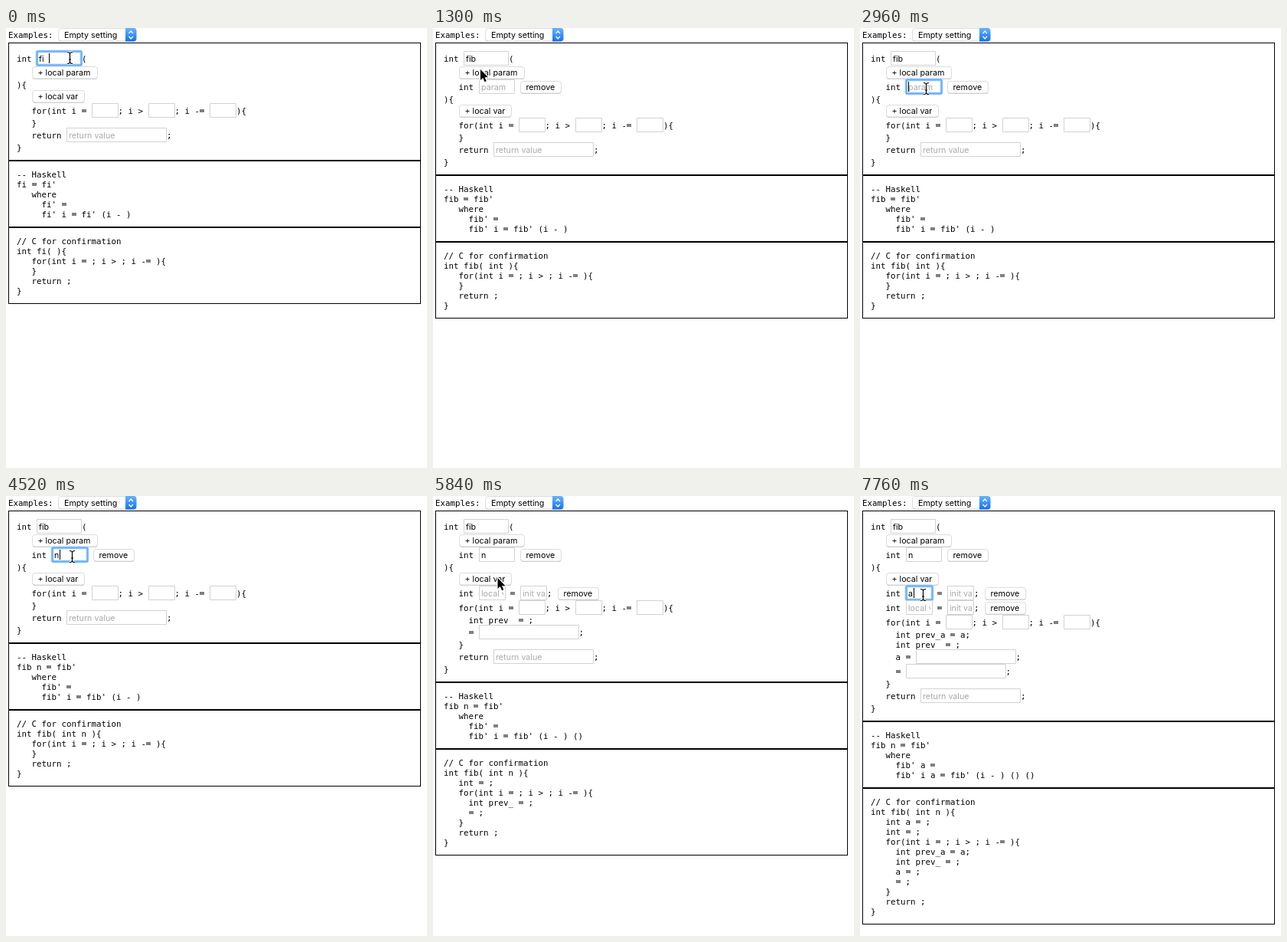
An HTML page with a canvas for the animation above (8000 ms loop, 550x574 px).

```html
<!DOCTYPE html>
<html lang="en">
<meta charset="utf-8">
<title>C to Haskell loop editor</title>
<style>
  html, body { margin: 0; width: 550px; height: 574px; overflow: hidden; background: #fff; }
  canvas { display: block; }
</style>
<canvas id="stage" width="550" height="574"></canvas>
<script>
const ctx = document.getElementById('stage').getContext('2d');
const LOOP = 8000, STEP = 120, BLINK = 480, CHAR = 6.5;
const MONO = '10.8px "DejaVu Sans Mono", monospace';
const SANS = '10.7px Inter, sans-serif';

// Pointer moves: start, end, x, y, shape on arrival
const moves = [
  [710, 1190, 62, 54, 'arrow'],
  [1900, 2360, 86, 74, 'arrow'],
  [2600, 2720, 86.5, 79, 'beam'],
  [5000, 5480, 84.5, 107, 'arrow'],
  [7160, 7280, 82.5, 129, 'beam']
];

function editorAt(t) {
  return {
    name: t < 120 ? 'fi' : 'fib',
    params: t < 1300 ? [] : [t < 4520 ? '' : 'n'],
    vars: t < 5840 ? [] : t < 6800 ? [''] : [t < 7760 ? '' : 'a', ''],
    focus: t < 1300 ? 'name' : t >= 2960 && t < 5840 ? 'param0' : t >= 7640 ? 'var0' : '',
    caret: Math.floor(Math.max(0, t - [230, 2960, 4520, 7640].findLast((s, i) => !i || t >= s)) / BLINK) % 2 === 0
  };
}

function text(str, x, y, font, color = '#000') {
  ctx.font = font;
  ctx.fillStyle = color;
  ctx.fillText(str, x, y);
}

// Equals signs are soft grey bars in this typeface
function code(str, x, center) {
  text(str.replaceAll('=', ' '), x, Math.round(center + 4), MONO);
  ctx.fillStyle = '#808080';
  for (const m of str.matchAll(/=/g))
    ctx.fillRect(Math.round(x + m.index * CHAR), Math.round(center) - 2, 6, 4);
}

function roundBox(x, y, w, h, r, fill, stroke, line = 1) {
  ctx.beginPath();
  ctx.roundRect(x, y, w, h, r);
  if (fill) { ctx.fillStyle = fill; ctx.fill(); }
  if (stroke) { ctx.strokeStyle = stroke; ctx.lineWidth = line; ctx.stroke(); }
}

function button(label, x, center, w) {
  const y = Math.floor(center) - 8;
  roundBox(x + .5, y + 1, w - 1, 16, 3.5, '#c4c4c4');
  roundBox(x + .5, y + .5, w - 1, 15.5, 3.5, '#fff', '#dcdcdc');
  text(label, x + 7.5, y + 12, SANS);
}

function input(field, x, center, state) {
  const { id, w, value = '', hint = '' } = field;
  const y = Math.floor(center - 9.5) + .5, focused = id && id === state.focus;
  x = Math.round(x);
  if (focused) {
    roundBox(x + .5, y, w - 1, 18, 2, '#fff', '#b9dbfa', 4);
    roundBox(x + .5, y, w - 1, 18, 1, null, '#62aef5', 2);
  } else {
    roundBox(x + .5, y, w - 1, 18, 0, '#fff', '#d2d2d2');
  }
  ctx.save();
  ctx.beginPath();
  ctx.rect(x + 3, y, w - 6, 18);
  ctx.clip();
  text(value || hint, x + 3, Math.round(center + 4), SANS, value ? '#000' : '#a9a9a9');
  ctx.restore();
  if (focused && state.caret) {
    const caretX = x + 3 + Math.round(ctx.measureText(value).width);
    ctx.fillStyle = '#000';
    ctx.fillRect(caretX, Math.floor(center) - 7, 1, 13);
  }
}

const join = (...parts) => parts.filter(Boolean).join(' ');
const box = (w, hint, value, id) => ({ w, hint, value, id });

function editorRows(s) {
  const remove = { label: 'remove', w: 54 };
  return [
    [0, 'int ', box(59, '', s.name, 'name'), '('],
    [3, { label: '+ local param', w: 86 }],
    ...s.params.map((p, i) => [3, 'int ', box(47, 'param', p, 'param' + i), ' ', remove]),
    [0, '){'],
    [3, { label: '+ local var', w: 69 }],
    ...s.vars.map((v, i) => [3, 'int ', box(35, 'local var', v, 'var' + i), ' = ', box(35, 'init value'), '; ', remove]),
    [3, 'for(int i = ', box(35), '; i > ', box(35), '; i -= ', box(35), '){'],
    ...s.vars.map(v => [5, `int prev_${v} = ${v};`]),
    ...s.vars.map(v => [5, join(v, '= '), box(131), ';']),
    [3, '}'],
    [3, 'return ', box(131, 'return value'), ';'],
    [0, '}']
  ];
}

function haskell(s) {
  return [
    '-- Haskell',
    join(s.name, ...s.params, `= ${s.name}'`),
    '   where',
    '     ' + join(s.name + "'", ...s.vars, '='),
    '     ' + join(s.name + "'", 'i', ...s.vars, `= ${s.name}'`, '(i - )', ...s.vars.map(() => '()'))
  ];
}

function cSource(s) {
  return [
    '// C for confirmation',
    `int ${s.name}( ${s.params.map(p => join('int', p) + ' ').join('')}){`,
    ...s.vars.map(v => '   ' + join('int', v, '= ;')),
    '   for(int i = ; i > ; i -= ){',
    ...s.vars.map(v => `     int prev_${v} = ${v};`),
    ...s.vars.map(v => '     ' + join(v, '= ;')),
    '   }',
    '   return ;',
    '}'
  ];
}

function frameBox(top, bottom) {
  ctx.strokeStyle = '#000';
  ctx.lineWidth = 1;
  ctx.strokeRect(3.5, top + .5, 538, bottom - top);
}

function drawEditor(s) {
  let top = 30.5;
  for (const [indent, ...items] of editorRows(s)) {
    const height = items.some(i => i.w && !i.label) ? 19 : items[0].label ? 18 : 13;
    const center = top + height / 2;
    let x = 14 + indent * CHAR;
    for (const item of items) {
      if (typeof item === 'string') {
        code(item, x, center);
        x += item.length * CHAR;
      } else {
        if (item.label) button(item.label, Math.round(x + .6), center, item.w);
        else input(item, x, center, s);
        x += item.w;
      }
    }
    top += height;
  }
  const bottom = Math.floor(top + 10);
  frameBox(19, bottom);
  return bottom;
}

function drawListing(lines, top) {
  lines.forEach((line, i) => code(line, 14, top + 17.5 + i * 13));
  const bottom = top + 21 + lines.length * 13;
  frameBox(top, bottom);
  return bottom;
}

function drawSelect() {
  code('Examples:', 3, 9);
  roundBox(68.5, 1, 101, 17, 4, '#c8c8c8');
  roundBox(68.5, .5, 101, 16.5, 4, '#fff', '#dedede');
  text('Empty setting', 76, 13, SANS);
  const blue = ctx.createLinearGradient(0, 0, 0, 18);
  blue.addColorStop(0, '#68b3fa');
  blue.addColorStop(1, '#146ff5');
  roundBox(156, 0, 14.5, 17.5, [0, 4, 4, 0], blue);
  ctx.strokeStyle = '#fff';
  ctx.lineWidth = 1.3;
  ctx.stroke(new Path2D('M160.5 7l2.7-3 2.7 3M160.5 11l2.7 3 2.7-3'));
}

const arrow = new Path2D('M0 0V14L3.2 11 5.5 16.3 7.8 15.3 5.5 10.2H10Z');
const beam = new Path2D('M-3.5-7.5Q0-7.5 0-5Q0-7.5 3.5-7.5M0-5V5M-3.5 7.5Q0 7.5 0 5Q0 7.5 3.5 7.5M-1.5 2H1.5');

function drawPointer(t) {
  let x = 83.5, y = 39, shape = 'beam';
  for (const [start, end, toX, toY, toShape] of moves) {
    if (t < start) break;
    const steps = Math.round((end - start) / STEP) + 1;
    const p = Math.min(1, (Math.floor((t - start) / STEP) + 1) / steps);
    x += (toX - x) * p;
    y += (toY - y) * p;
    if (p > .5) shape = toShape;
  }
  ctx.save();
  ctx.translate(x, y);
  ctx.strokeStyle = '#fff';
  ctx.lineWidth = shape === 'arrow' ? 2 : 3;
  ctx.stroke(shape === 'arrow' ? arrow : beam);
  ctx.fillStyle = ctx.strokeStyle = '#000';
  ctx.lineWidth = 1.2;
  if (shape === 'arrow') ctx.fill(arrow);
  else ctx.stroke(beam);
  ctx.restore();
}

function draw(now) {
  const t = now % LOOP, state = editorAt(t);
  ctx.fillStyle = '#fff';
  ctx.fillRect(0, 0, 550, 574);
  drawSelect();
  const middle = drawListing(haskell(state), drawEditor(state) + 1);
  drawListing(cSource(state), middle + 1);
  drawPointer(t);
  requestAnimationFrame(draw);
}
requestAnimationFrame(draw);
</script>
</html>
```
